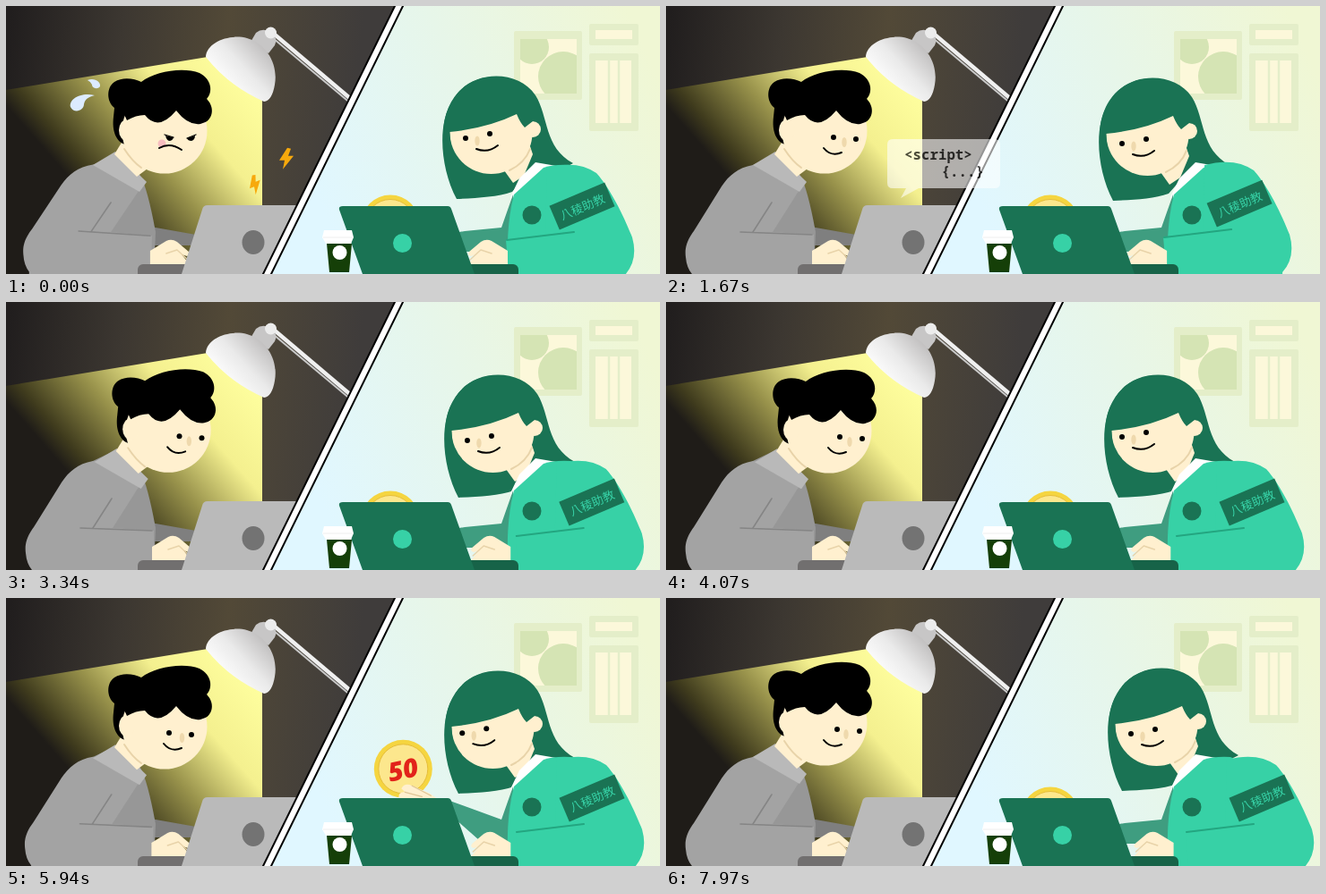
Animation, 730 px wide and 300 px high, one loop 8 s. Source, as an HTML page:

```html
<!DOCTYPE html>
<html lang="zh-Hant">
<head>
<meta charset="utf-8">
<title>Study partners</title>
<style>
html, body { margin: 0; width: 100%; height: 100%; overflow: hidden; }
svg { display: block; width: 730px; height: 300px; }
.code { font: 600 15.8px "Noto Sans Mono", "DejaVu Sans Mono", monospace; fill: #222; }
.line { fill: none; stroke-linecap: round; stroke-linejoin: round; }
</style>
</head>
<body>
<svg viewBox="0 0 730 300" xmlns="http://www.w3.org/2000/svg">
<defs>
  <linearGradient id="day" gradientUnits="userSpaceOnUse" x1="350" y1="220" x2="715" y2="50">
    <stop stop-color="#e0f7ff"/><stop offset=".5" stop-color="#e7f6e9"/><stop offset="1" stop-color="#f0f7d4"/>
  </linearGradient>
  <linearGradient id="night" gradientUnits="userSpaceOnUse" x1="0" y1="60" x2="390" y2="100">
    <stop stop-color="#211e1e"/><stop offset=".32" stop-color="#3c3731"/><stop offset=".62" stop-color="#524937"/><stop offset="1" stop-color="#3f3c3b"/>
  </linearGradient>
  <linearGradient id="beam" gradientUnits="userSpaceOnUse" x1="280" y1="90" x2="111" y2="238">
    <stop stop-color="#ffff9f"/><stop offset=".35" stop-color="#f4f08f"/><stop offset=".63" stop-color="#98924b"/>
    <stop offset=".9" stop-color="#3f3b1d"/><stop offset="1" stop-color="#1f1c18"/>
  </linearGradient>
  <linearGradient id="metal" gradientUnits="userSpaceOnUse" x1="240" y1="88" x2="292" y2="40">
    <stop stop-color="#fff"/><stop offset=".45" stop-color="#eaeaea"/><stop offset="1" stop-color="#b8b6b6"/>
  </linearGradient>
  <clipPath id="leftHalf"><path d="M0 0H436L288 300H0Z"/></clipPath>
  <clipPath id="print"><path d="M574 37H637V98H574Z"/></clipPath>
  <g id="bubble">
    <path d="M253 149H367Q373 149 373 155V198Q373 204 367 204H282L262 215L268 204H253Q247 204 247 198V155Q247 149 253 149Z" fill="#fff" fill-opacity=".72"/>
    <text class="code" x="266" y="171.500">&lt;script&gt;</text>
    <text class="code" x="307.500" y="190.500">{...}</text>
  </g>
  <path id="bolt" d="M1 -12L-8 2H-2L-4 12L8 -3H2L5 -11Z" fill="#f7a90c"/>
  <g id="hand">
    <path d="M163 274L181 263Q187 260 193 264L206 275Q209 279 204 280L198 278L207 289H163Z" fill="#fff0cf"/>
    <path class="line" d="M181 277L193 273L205 284" stroke="#e8d3a9" stroke-width="1.500"/>
  </g>
</defs>

<rect width="730" height="300" fill="url(#day)"/>
<g fill="#e4eec9">
  <rect x="567" y="28" width="76" height="77" rx="2"/>
  <rect x="651" y="20" width="55" height="24" rx="2"/>
  <rect x="651" y="53" width="55" height="87" rx="2"/>
</g>
<path d="M574 37H637V98H574ZM658 27H699V37H658ZM658 61H698V131H658Z" fill="#fcf8da"/>
<path d="M673 61V131M684 61V131" stroke="#e4eec9" stroke-width="2.500"/>
<g clip-path="url(#print)" fill="#d5e4b4"><circle cx="587" cy="46" r="19"/><circle cx="622" cy="79" r="28"/></g>

<g id="girlBack">
  <path d="M503 216C485 182 481 132 498 107C515 72 570 69 591 100C606 124 600 158 633 176C622 183 598 186 580 191L565 208C548 214 525 215 503 216Z" fill="#1a7354"/>
  <path d="M556 184L582 148L588 166L578 190L566 198Z" fill="#fff0cf"/>
</g>
<path d="M563 214L573 193L591 175L620 180L596 198L566 222Z" fill="#fff"/>
<path id="farSleeve" fill="#3f9d80"/>
<path d="M567 211L600 181Q612 177 630 178L655 190L660 300H561Q557 250 567 211Z" fill="#37d1a6"/>
<circle cx="587" cy="234" r="10.500" fill="#1a7354"/>
<g id="girlArm">
  <path d="M604 181Q638 172 659 187C675 205 690 236 699 259Q706 284 691 301V310H562L558 262L602 256Z" fill="#37d1a6"/>
  <path class="line" d="M559 262L634 253" stroke="#23a680" stroke-width="2"/>
  <g transform="translate(643 224) rotate(-23)">
    <rect x="-33.500" y="-14.500" width="67" height="29" fill="#1a7354"/>
    <text y="6" text-anchor="middle" font-family="'Noto Sans CJK TC','Noto Sans CJK',sans-serif" font-size="13.200" fill="#37d1a6">八稜助教</text>
  </g>
</g>
<g id="girlHead">
  <circle cx="588" cy="138" r="9" fill="#fff0cf"/>
  <circle cx="541.500" cy="142" r="46" fill="#fff0cf"/>
  <path class="line" d="M562 184Q579 176 585 160" stroke="#e8d3a9" stroke-width="2"/>
  <path d="M488 145C488 104 513 79 547 79C581 80 600 106 598 130L588 129L579 136Q574 131 570 121Q537 137 495 141L497 158Z" fill="#1a7354"/>
</g>
<g id="girlFace">
  <circle r="3"/><circle cx="27" cy="-5" r="3"/>
  <ellipse cx="13" cy="3" rx="2.700" ry="5.500" fill="#efd9ad"/>
  <path class="line" d="M12 12Q25 17 36 8" stroke="#000" stroke-width="2"/>
</g>

<g id="coin">
  <circle cx="445" cy="185" r="32.500" fill="#f5d540"/>
  <circle cx="445" cy="185" r="27.500" fill="#fce78d" stroke="#e6bd39" stroke-width="1"/>
  <text transform="translate(447 196) rotate(-12)" text-anchor="middle" font-family="'Open Sans','Noto Sans',sans-serif" font-size="29" font-weight="800" font-style="italic" fill="#e2231a">50</text>
  <path d="M440 217Q440 210 447 211L443 207Q447 200 455 204L474 212L488 222L482 234L456 228Z" fill="#fff0cf"/>
  <path class="line" d="M447 211L466 216M455 204L476 215" stroke="#dfc696" stroke-width="1.300"/>
</g>
<g id="girlHand"><use href="#hand" transform="translate(723 0) scale(-1 1)"/></g>
<rect x="505" y="289" width="67" height="18" rx="6" fill="#176348"/>
<path d="M376 224H493Q496 224 497 227L523 300H398L372 228Q371 224 376 224Z" fill="#1a7354"/>
<circle cx="442.500" cy="265.500" r="10.500" fill="#37d1a6"/>
<path d="M358 266H386L383 298H361Z" fill="#153f08"/>
<path d="M355 251H386L388 259L385 266H357L353 259Z" fill="#fff"/>
<path d="M354 259H387" stroke="#eee" stroke-width="1"/>
<circle cx="372.500" cy="276" r="8" fill="#fff"/>

<g clip-path="url(#leftHalf)">
  <rect width="440" height="300" fill="url(#night)"/>
  <path d="M0 94L225 57L286 100V300H0Z" fill="url(#beam)"/>
  <path d="M300 32L386 105" stroke="#f0f0f0" stroke-width="4.500"/>
  <path d="M298 36L386 110" stroke="#c9c9c9" stroke-width="2"/>
  <path d="M272 42L279 30Q286 24 296 29Q304 36 300 44L293 53Z" fill="#c7c6c6"/>
  <circle cx="295.500" cy="30" r="6.500" fill="#ececec"/>
  <path d="M223 57C224 40 250 31 269 36C292 43 304 66 300 88Q297 106 288 107Q249 90 223 57Z" fill="url(#metal)"/>

  <g id="sweat" fill="#dcebff">
    <path d="M99 100C84 96 70 104 72 113C76 121 87 117 87 110C88 104 92 102 99 100Z"/>
    <path d="M91 83C99 80 106 85 105 90C102 94 96 92 96 88Q95 85 91 83Z"/>
  </g>
  <g id="bolts"><use href="#bolt" x="313" y="171"/><use href="#bolt" transform="translate(278 200) rotate(-22) scale(.9)"/></g>

  <path d="M150 245L212 256V268H150Z" fill="#7f7f7f"/>
  <path d="M97 178L122 166L150 190Q158 204 167 253L165 300H70L60 215Z" fill="#979797"/>
  <g id="boyArm">
    <path d="M97 178C80 181 70 190 62 202L31 252C22 264 21 273 22 281Q23 293 29 300V312H165V256L119 253L150 204L118 180Z" fill="#a3a3a3"/>
    <path class="line" d="M118 220L97 253M83 253L163 256" stroke="#858585" stroke-width="1.600"/>
  </g>
  <g id="boyNeck">
    <path d="M97 178L122 163L157 197L149 208Z" fill="#b9b9b9"/>
    <path d="M132 148L166 176L146 191L121 166Z" fill="#fff0cf"/>
  </g>
  <g id="boyHead">
    <path d="M133 155C123 152 118 140 120 124L121 114C112 107 112 91 121 85C130 79 143 81 151 85C166 73 198 68 216 75C230 82 231 97 224 104C235 115 230 132 214 132L150 128Z"/>
    <circle cx="177" cy="140" r="47.500" fill="#fff0cf"/>
    <ellipse cx="135" cy="139" rx="9" ry="12" fill="#fff0cf"/>
    <path class="line" d="M132 160Q141 174 151 181" stroke="#e8d3a9" stroke-width="2"/>
    <path d="M135 128Q145 122 155 122Q170 141 190 117Q203 134 217 132Q228 130 229 119L224 104L215 76L151 85L124 104Z"/>
    <g id="sadMouth"><circle cx="174" cy="154" r="4.500" fill="#f7bec0"/><path class="line" d="M171 159Q183 152 196 161" stroke="#000" stroke-width="2"/></g>
    <path id="smile" class="line" d="M176 159Q184 169 196 164" stroke="#000" stroke-width="2"/>
    <ellipse id="gasp" cx="187" cy="161.500" rx="5.500" ry="3.200" fill="#e6d0a3"/>
  </g>
  <ellipse id="boyNose" rx="2.700" ry="5.500" fill="#efd9ad"/>
  <g id="boyEyes">
    <g id="dots"><circle r="3"/><circle cx="25" cy="2" r="3"/></g>
    <g id="tired"><path d="M-5 -2L4 0Q3 4 -1 4Q-4 3 -5 -2ZM28 -2L19 1Q20 4 24 4Q28 3 28 -2Z"/><path class="line" d="M-6 -3L4 0M29 -3L19 1" stroke="#000" stroke-width="1.300"/></g>
    <g id="wide" stroke="#000" stroke-width="2.200" fill="#fff"><circle r="2.500"/><circle cx="25" cy="2" r="2.500"/></g>
  </g>
  <use id="boyHand" href="#hand"/>
  <rect x="147" y="289" width="70" height="18" rx="6" fill="#716f6f"/>
  <path d="M225 223H340V300H196L219 228Q220 223 225 223Z" fill="#bababa"/>
  <ellipse cx="276" cy="264.500" rx="12.500" ry="13.500" fill="#737373"/>
</g>
<path d="M435 -2L286 302H295L444 -2Z" fill="#fff" stroke="#000" stroke-width="2"/>
<use id="boySays" href="#bubble"/>
<use id="girlSays" href="#bubble" x="117"/>
</svg>

<script>
const LOOP = 8000;
const TALK_GAP = 5150;
const $ = Object.fromEntries([...document.querySelectorAll('[id]')].map(e => [e.id, e]));

// Smooth 0 to 1 from a to b.
function ease(t, a, b) {
  const u = Math.min(1, Math.max(0, (t - a) / (b - a)));
  return u * u * (3 - 2 * u);
}
// Rises after a, is gone again at b; each ramp lasts d.
const during = (t, a, b, d) => ease(t, a, a + d) - ease(t, b - d, b);
const wave = (t, period) => Math.sin(2 * Math.PI * t / period);
const cosWave = (t, period) => wave(t + period / 4, period);

const move = (el, x, y) => el.setAttribute('transform', `translate(${x.toFixed(2)} ${y.toFixed(2)})`);
const fade = (el, v) => el.setAttribute('opacity', v.toFixed(3));
const show = (el, on) => el.setAttribute('display', on ? 'inline' : 'none');
const speak = (el, t, start) =>
  fade(el, during(t, start, start + 950, 250) + during(t, start + TALK_GAP, start + TALK_GAP + 950, 250));

function drawBoy(t) {
  const sad = t < 850, shocked = t >= 4750 && t < 5850, happy = !sad && !shocked;
  const x = 5 * during(t, 2600, 5400, 1000);
  const y = 4 * during(t, 2600, 7300, 1000);
  const eyeX = 183 + 8 * ease(t, 850, 2500) + .6 * x - 9 * during(t, 4700, 7250, 550);
  const eyeY = 147 + y;
  const busy = 1 - ease(t, 1300, 1600) + during(t, 5850, 7000, 300);
  const lean = busy * (6.5 - 3.5 * cosWave(t, 834));

  move($.boyHead, x, y);
  move($.boyNeck, x * .4, y * .3);
  move($.boyEyes, eyeX, eyeY);
  move($.boyNose, (eyeX + x + 187) / 2 + 12, (eyeY + y + 162) / 2 - 2);
  $.boyArm.setAttribute('transform', `rotate(${(lean * .53).toFixed(2)} 118 185)`);
  move($.boyHand, -lean * .7, 0);
  for (const el of [$.tired, $.sadMouth]) show(el, sad);
  for (const el of [$.wide, $.gasp]) show(el, shocked);
  for (const el of [$.dots, $.smile]) show(el, happy);
  show($.boyNose, !sad);

  const mood = 1 - ease(t, 450, 850);
  move($.sweat, -t * .008, -t * .012);
  move($.bolts, 0, -t * .16);
  fade($.sweat, mood);
  fade($.bolts, mood);
  speak($.boySays, t, 900);
}

function drawGirl(t) {
  const sway = 1 - ease(t, 2540, 3300), turn = ease(t, 6900, 7600);
  const x = 2 + sway * (2 * cosWave(t, 3340) - 4) + 4 * turn;
  const y = 3 + sway * (3 * wave(t, 1500) - 3) - 3 * turn;
  const look = during(t, 3300, 6600, 750);
  const reach = 15 * ease(t, 2600, 3400) - 4 * ease(t, 0, 2540) + 11 * turn;

  move($.girlBack, x, y);
  move($.girlHead, x, y);
  move($.girlFace, 513 + x - 6 * look, 148 + y + 4 * (ease(t, 300, 1500) - look));
  move($.girlArm, reach, Math.min(0, reach));
  move($.girlHand, reach * .3, 0);

  const lift = during(t, 4450, 6300, 450);
  move($.coin, 16 * (lift - 1), 59 * (1 - lift));
  $.farSleeve.setAttribute('d',
    `M553 248L${512 - 24 * lift} ${252 - 30 * lift}l-12 2L${512 + 23 * lift} 275H570L566 211Z`);
  speak($.girlSays, t, 1750);
}

function tick(now) {
  const t = now % LOOP;
  drawBoy(t);
  drawGirl(t);
  requestAnimationFrame(tick);
}
tick(0);
</script>
</body>
</html>
```
